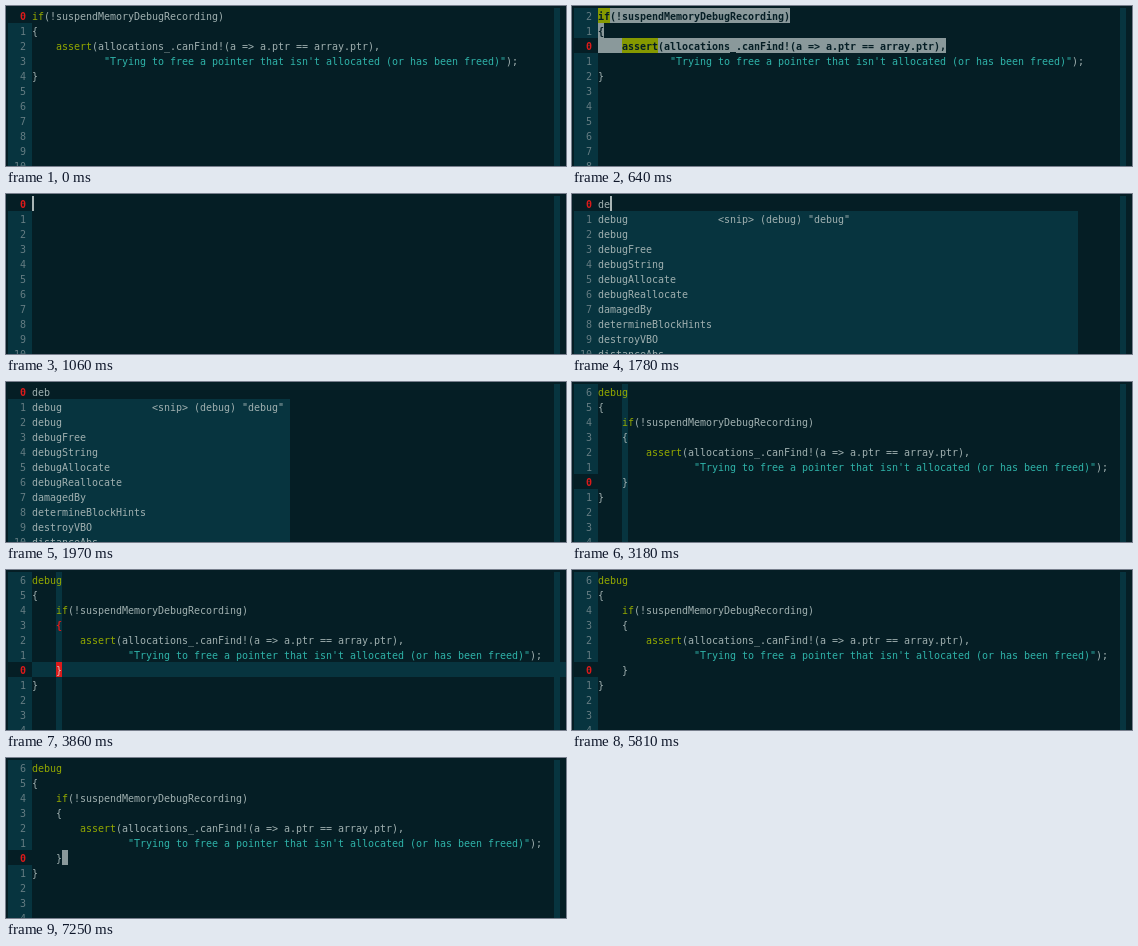
Animation, 560 px wide and 160 px high, one loop 8000 ms. Source, as an HTML page with a canvas:

```html
<!DOCTYPE html>
<html lang="en">
<head>
<meta charset="utf-8">
<title>Editor session</title>
<style>
html, body { margin: 0; width: 100%; height: 100%; overflow: hidden; background: #051e25; }
canvas { display: block; }
</style>
</head>
<body>
<canvas id="stage" width="560" height="160"></canvas>
<script>
const ctx = document.getElementById('stage').getContext('2d');
const LOOP = 8000, ROWS = 11, CELL = 6, LINE = 15, LEFT = 26, TOP = 2;
const C = {
  back: '#051e25', panel: '#07343f', text: '#a0b0b0', number: '#647c82',
  keyword: '#93a800', string: '#2fb3a9', red: '#dc1a1a', block: '#8a999b',
  keywordBlock: '#859900', stringBlock: '#2aa198', bar: '#aab6b6'
};
const blockOf = {
  [C.text]: C.block, [C.keyword]: C.keywordBlock, [C.string]: C.stringBlock
};

const code = [
  'if(!suspendMemoryDebugRecording)',
  '{',
  '    assert(allocations_.canFind!(a => a.ptr == array.ptr),',
  '            "Trying to free a pointer that isn\'t allocated (or has been freed)");',
  '}'
];
const wrapped = ['debug', '{', ...code.map(line => '    ' + line), '}'];
const withJ = wrapped.map((line, i) => i === 6 ? line + 'j' : line);
const matches = [
  'debug               <snip> (debug) "debug"', 'debug', 'debugFree', 'debugString',
  'debugAllocate', 'debugReallocate', 'damagedBy', 'determineBlockHints',
  'destroyVBO', 'distanceAbs'
];

// Each entry changes part of the editor state from its time on.
const steps = [
  [0, { lines: code, row: 0, col: 0, caret: '', select: null, popup: 0, chosen: false, column: false, line: false }],
  [80, { caret: 'block' }],
  [310, { select: [0, 0, 0, 99] }],
  [390, { select: [0, 0, 1, 99], row: 1, caret: '' }],
  [440, { caret: 'block' }],
  [600, { select: [0, 0, 2, 99], row: 2, caret: '' }],
  [640, { caret: 'block' }],
  [720, { select: [0, 0, 3, 99], row: 3 }],
  [840, { select: [0, 0, 4, 99], row: 4, caret: '' }],
  [880, { caret: 'block' }],
  [1020, { lines: [''], row: 0, select: null, caret: '' }],
  [1060, { caret: 'bar' }],
  [1500, { lines: ['d'], col: 1, caret: '' }],
  [1540, { caret: 'bar' }],
  [1690, { lines: ['de'], col: 2, caret: '' }],
  [1730, { caret: 'bar' }],
  [1770, { popup: 506 }],
  [1890, { lines: ['deb'], col: 3, caret: '' }],
  [1970, { popup: 284 }],
  [2010, { caret: 'bar' }],
  [2050, { lines: ['debug'], col: 5, caret: '', chosen: true }],
  [2090, { caret: 'bar' }],
  [2270, { popup: 0, chosen: false, caret: '' }],
  [2310, { lines: wrapped, row: 6, col: 4, column: true }],
  [2360, { select: [2, 4, 6, 4] }],
  [3180, { select: null }],
  [3220, { column: false, col: 5 }],
  [3260, { caret: 'block' }],
  [3670, { lines: withJ }],
  [3820, { lines: wrapped, col: 4, caret: '' }],
  [3860, { column: true, line: true, caret: 'match' }],
  [5810, { column: false, line: false, caret: '', col: 5 }],
  [5850, { caret: 'block' }],
  [6950, { caret: '' }],
  [7250, { caret: 'block' }]
];

const xOf = col => LEFT + col * CELL;
const yOf = row => TOP + row * LINE;

function fill(color, x, y, w, h) {
  ctx.fillStyle = color;
  ctx.fillRect(x, y, w, h);
}

// Text sits on the terminal grid, one character per cell.
function write(text, x, row, color, bold) {
  ctx.font = (bold ? 'bold ' : '') + '10px "DejaVu Sans Mono", monospace';
  ctx.fillStyle = color;
  [...text].forEach((char, i) => ctx.fillText(char, x + i * CELL, yOf(row) + 12));
}

function colorsOf(line) {
  const colors = Array(line.length).fill(C.text);
  for (const m of line.matchAll(/"[^"]*"|\b(?:if|assert|debug)\b/g)) {
    colors.fill(m[0][0] === '"' ? C.string : C.keyword, m.index, m.index + m[0].length);
  }
  return colors;
}

function isSelected(select, row, col) {
  if (!select) return false;
  const [r0, c0, r1, c1] = select;
  return (row > r0 || row === r0 && col >= c0) && (row < r1 || row === r1 && col < c1);
}

function drawLine(line, row, s) {
  const colors = colorsOf(line);
  [...line].forEach((char, col) => {
    const x = xOf(col);
    let color = colors[col];
    const selected = isSelected(s.select, row, col);
    if (selected) {
      fill(blockOf[color], x, yOf(row), CELL, LINE);
      color = C.back;
    }
    const atCaret = row === s.row && col === s.col;
    if (atCaret && s.caret === 'block') color = C.back;
    if (s.caret === 'match' && col === s.col) {
      if (row === s.row) color = '#d6c3bf';
      if (row === 3) color = C.red;
    }
    write(char, x, row, color, selected || color === C.red);
  });
}

function drawCaret(s) {
  const x = xOf(s.col), y = yOf(s.row);
  if (s.caret === 'block') fill(C.block, x, y, CELL, LINE);
  if (s.caret === 'bar') fill(C.bar, x, y, 2, LINE);
  if (s.caret === 'match') fill(C.red, x, y, CELL, LINE);
}

function drawGutter(s) {
  fill(C.panel, 2, TOP, 24, 158);
  fill(C.back, 2, yOf(s.row), 24, LINE);
  for (let i = 0; i < ROWS; i++) {
    const current = i === s.row;
    const label = String(Math.abs(i - s.row)).padStart(2);
    write(label, 8, i, current ? C.red : C.number, current);
  }
}

function drawPopup(s) {
  fill(C.panel, 20, yOf(1), s.popup - 20, 160);
  if (s.chosen) fill(C.number, 20, yOf(1), s.popup - 20, LINE);
  matches.forEach((text, i) => write(text, LEFT, i + 1, C.text));
}

function draw(s) {
  fill(C.back, 0, 0, 560, 160);
  fill(C.panel, 548, TOP, 6, 158);
  if (s.column) fill(C.panel, xOf(s.col), TOP, CELL, 158);
  if (s.line) fill(C.panel, LEFT, yOf(s.row), 534, LINE);
  drawGutter(s);
  drawCaret(s);
  s.lines.forEach((line, row) => drawLine(line, row, s));
  if (s.popup) drawPopup(s);
}

function stateAt(time) {
  return Object.assign({}, ...steps.filter(([at]) => at <= time).map(step => step[1]));
}

const start = performance.now();
function tick() {
  draw(stateAt((performance.now() - start) % LOOP));
  requestAnimationFrame(tick);
}
tick();
</script>
</body>
</html>
```
